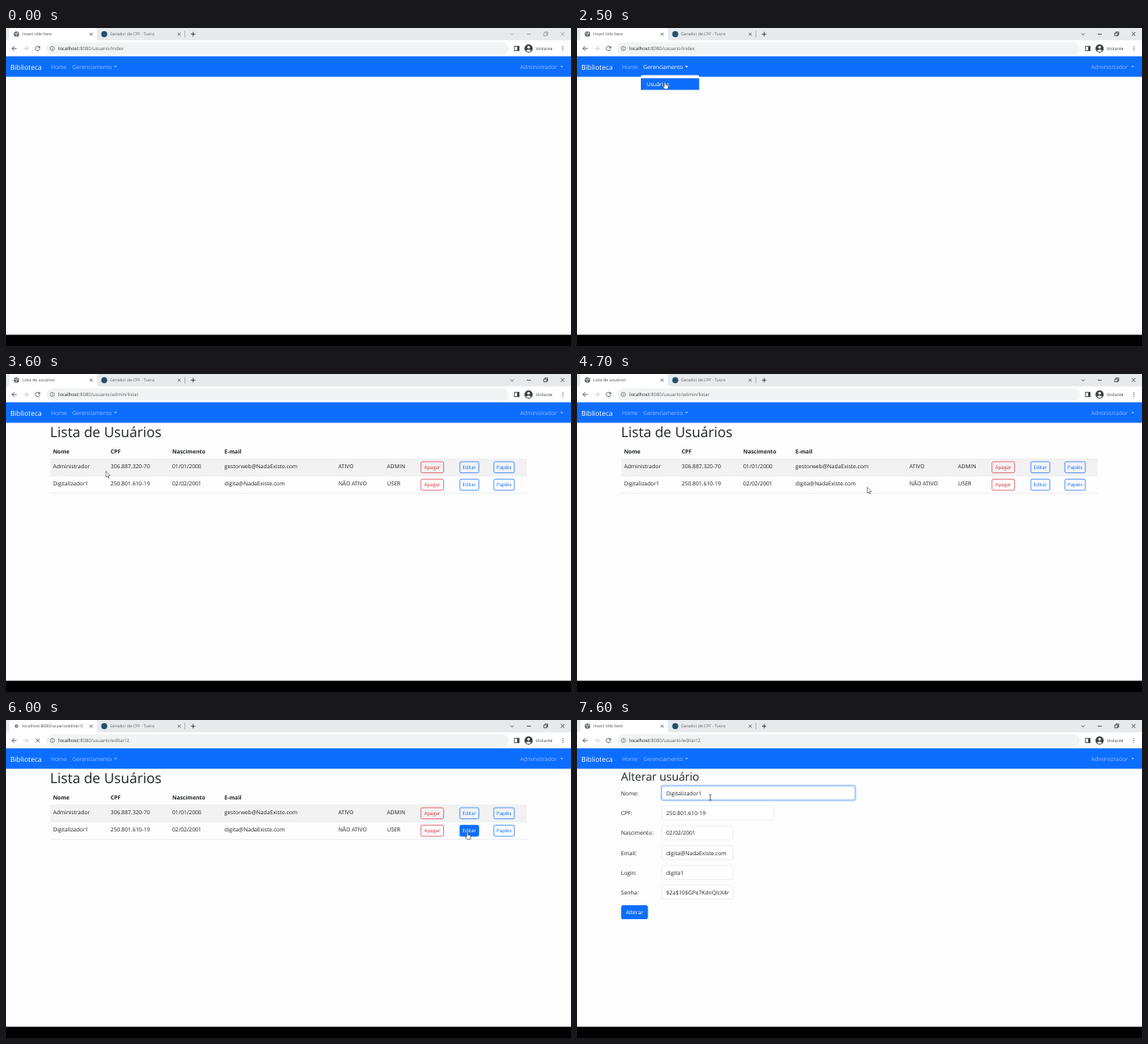
Write an HTML page that moves like this. It is 690 px wide and 388 px high and loops after 8000 ms.

```html
<!DOCTYPE html>
<html lang="pt">
<head>
<meta charset="utf-8">
<title>Biblioteca</title>
<style>
html, body { margin: 0; width: 100%; height: 100%; overflow: hidden; background: #fdfdfd; }
svg#stage { display: block; width: 100vw; height: 100vh; }
text { font-family: "Open Sans", "Noto Sans", sans-serif; font-size: 6.72px; fill: #212529; text-rendering: geometricPrecision; white-space: pre; }
</style>
</head>
<body>
<svg id="stage" viewBox="0 0 690 388"></svg>
<script>
const LOOP = 8000;
const BLUE = '#0d6efd';
const RED = '#dc3545';

// Markup helpers
const text = (x, y, str, attrs = '') => `<text x="${x}" y="${y}" ${attrs}>${str}</text>`;
const sized = (px, fill) => `style="font-size:${px}px;fill:${fill}"`;
const rect = (x, y, w, h, fill, attrs = '') =>
  `<rect x="${x}" y="${y}" width="${w}" height="${h}" fill="${fill}" ${attrs}/>`;
const circle = (x, y, r, fill, attrs = '') => `<circle cx="${x}" cy="${y}" r="${r}" fill="${fill}" ${attrs}/>`;
const line = (d, color, width = 0.8, attrs = '') =>
  `<path d="${d}" fill="none" stroke="${color}" stroke-width="${width}" ${attrs}/>`;
const group = (id, content, attrs = '') => `<g id="${id}" ${attrs}>${content}</g>`;
const cross = (x, y, r, color, width) =>
  line(`M${x - r} ${y - r}l${2 * r} ${2 * r}m0 ${-2 * r}l${-2 * r} ${2 * r}`, color, width);
const caret = (x, y, fill) => `<path d="M${x} ${y}h4l-2 2z" fill="${fill}"/>`;

function browserBar() {
  const grey = '#5f6368';
  return rect(0, 0, 690, 15, '#e7eaed') +
    '<path d="M1 15q3 0 3-3V3q0-3 3-3H108q3 0 3 3v9q0 3 3 3z" fill="#fff"/>' +
    rect(0, 15, 690, 20, '#fff') +
    group('globe', circle(0, 0, 3.3, grey) +
      line('M-2.4-1.2L-.4-.6 .1 .8-.7 2.6M.7-2.6L.9-1 2.6-.2', '#fff', 0.8), 'transform="translate(12.8 7.5)"') +
    group('spinner', circle(0, 0, 2, grey) + circle(0, 0, 0.8, '#fff'), 'transform="translate(12.8 7.5)"') +
    text(20, 9.3, '', `id="tabTitle" ${sized(5.05, '#45494d')}`) +
    cross(104, 7.5, 1.7, '#3c4043', 0.8) +
    circle(120, 7.5, 3.7, '#24506f') +
    text(127, 9.3, 'Gerador de CPF - Tuvra', sized(5.05, grey)) +
    cross(211.5, 7.5, 1.7, '#3c4043', 0.8) +
    line('M218.5 3.5v8', '#8d9196', 0.6) +
    line('M225.8 7.5h5.4m-2.7-2.7v5.4', '#3c4043', 0.9) +
    group('windowButtons',
      line('M616 6.5l2 2 2-2M636 7.5h5M656.8 6h3.6v3.6h-3.6zM658 6V4.9h3.6v3.6h-1.2M677.4 5l4.6 4.6m0-4.6l-4.6 4.6', 'currentColor', 0.7)) +
    line('M13 25H7.4m2.7-2.8L7.3 25l2.8 2.8', '#4a4d51', 0.9) +
    line('M21.5 25h5.6m-2.7-2.8l2.8 2.8-2.8 2.8', '#c3c6c9', 0.9) +
    group('reload', line('M40.6 23.2a2.7 2.7 0 1 0 .6 2.3', '#4a4d51', 0.9) +
      '<path d="M41.5 21.8v2.8h-2.8z" fill="#4a4d51"/>') +
    group('stop', cross(38.7, 25, 2.3, '#4a4d51', 0.9)) +
    rect(49, 17.5, 565, 15, '#f1f3f4', 'rx="7.5"') +
    circle(56.5, 25, 2.6, 'none', `stroke="${grey}" stroke-width=".7"`) +
    line('M56.5 24.6v1.8M56.5 23.2v.7', grey, 0.7) +
    `<text x="64" y="27.2" ${sized(5.9, grey)}><tspan fill="#202124">localhost</tspan><tspan id="path"></tspan></text>` +
    rect(621, 22.3, 5.6, 5.4, 'none', 'stroke="#3c4043" stroke-width=".9"') +
    rect(624.2, 22.3, 2.4, 5.4, '#3c4043') +
    circle(638.2, 25, 5, '#3c4043') + circle(638.2, 23.4, 1.6, '#fff') +
    '<path d="M635 27.8q3.2-3 6.4 0q-3.2 2.4-6.4 0z" fill="#fff"/>' +
    text(647, 26.9, 'Visitante', sized(5.1, '#3c4043')) +
    [22.7, 25, 27.3].map(y => circle(680, y, 0.65, '#4a4d51')).join('');
}

function navbar() {
  const dim = 'rgba(255,255,255,.55)';
  return rect(0, 34.5, 690, 25, BLUE) +
    text(5.3, 50.5, 'Biblioteca', sized(8.4, '#fff')) +
    text(55, 50, 'Home', `style="fill:${dim}"`) +
    group('menuLink', text(81, 50, 'Gerenciamento', 'style="fill:#fff"') + caret(131.8, 46.3, '#fff')) +
    text(627.8, 50, 'Administrador', `style="fill:${dim}"`) + caret(676.7, 46.3, dim);
}

const dropdown = () =>
  rect(78, 57.5, 71.2, 21, '#fdfdfd', 'rx="2" stroke="#000" stroke-opacity=".06" stroke-width=".5"') +
  rect(78, 61.3, 71.2, 14.2, 'none', 'id="menuItem"') +
  text(85, 71, 'Usuários', 'id="menuText"');

const outlineButton = (x, y, w, label, color, id = label + y) =>
  group(id, rect(x, y, w, 13.6, 'none', `rx="1.8" stroke="${color}" stroke-width=".7"`) +
    text(x + w / 2, y + 9, label, `text-anchor="middle" ${sized(6, color)}`));

function listPage() {
  const columns = [57.4, 127.8, 203, 266.8, 406, 465.3];
  const users = [
    ['Administrador', '306.887.320-70', '01/01/2000', 'gestorweb@NadaExiste.com', 'ATIVO', 'ADMIN'],
    ['Digitalizador1', '250.801.610-19', '02/02/2001', 'digita@NadaExiste.com', 'NÃO ATIVO', 'USER'],
  ];
  const heads = ['Nome', 'CPF', 'Nascimento', 'E-mail'];
  const row = (cells, i) => {
    const y = 103 + i * 21.3;
    return (i ? '' : rect(54, y, 582, 21.3, '#f2f2f2')) +
      line(`M54 ${y + 21.3}h582`, '#dee2e6', 0.6) +
      cells.map((cell, c) => text(columns[c], y + 12, cell)).join('') +
      outlineButton(506.8, y + 4, 27.6, 'Apagar', RED, 'delete' + i) +
      outlineButton(554.2, y + 4, 23.2, 'Editar', BLUE, 'edit' + i) +
      outlineButton(595.8, y + 4, 25, 'Papéis', BLUE, 'roles' + i);
  };
  return text(53.8, 77, 'Lista de Usuários', sized(17.1, '#212529')) +
    heads.map((head, c) => text(columns[c], 96.6, head, 'font-weight="700"')).join('') +
    users.map(row).join('');
}

function formPage() {
  const fields = [
    ['Nome', 'Digitalizador1', 236], ['CPF', '250.801.610-19', 137], ['Nascimento', '02/02/2001', 87],
    ['Email', 'digita@NadaExiste.com', 87], ['Login', 'digita1', 87], ['Senha', '$2a$10$GPe7KdnQIcX4n', 87],
  ];
  const field = ([label, value, width], i) => {
    const y = 80.6 + i * 24.25;
    return text(53.8, y + 11.2, label + ':') +
      rect(103.5, y, width, 16.9, '#fff', `rx="2.4" stroke="#dfe3e7" stroke-width=".6"`) +
      `<svg x="109" y="${y}" width="${width - 10.4}" height="17">${text(0, 11.2, value)}</svg>`;
  };
  return text(53.8, 74, 'Alterar usuário', sized(13.75, '#212529')) +
    fields.map(field).join('') +
    group('focus',
      rect(102.6, 79.7, 237.8, 18.7, 'none', `rx="3.2" stroke="${BLUE}" stroke-opacity=".25" stroke-width="1.8"`) +
      rect(103.5, 80.6, 236, 16.9, 'none', 'rx="2.4" stroke="#86b7fe" stroke-width=".7"')) +
    group('textCaret', line('M152.3 84.6v9', '#212529', 0.6)) +
    rect(54, 226, 32.6, 17, BLUE, 'rx="2.6"') +
    text(70.3, 237.3, 'Alterar', 'text-anchor="middle" style="fill:#fff"');
}

const pointers = () =>
  group('arrow', '<path d="M0 0v7.4l1.7-1.6 1.2 2.7 1.1-.5-1.2-2.6h2.4z" fill="#fff" stroke="#222" stroke-width=".5"/>') +
  group('hand', '<path d="M-.8.7Q0-.6.8.7V3.3l2.7.8q.9.3.7 1.4L3.6 8.6H-.6L-2.6 5.4q.2-1 1.8.1z" fill="#fff" stroke="#222" stroke-width=".55"/>') +
  group('beam', line('M-1.4-3.6Q0-3.6 0-3Q0-3.6 1.4-3.6M0-3v6M-1.4 3.6Q0 3.6 0 3Q0 3.6 1.4 3.6', '#222', 0.7));

document.getElementById('stage').innerHTML =
  rect(0, 0, 690, 388, '#fdfdfd') + browserBar() + navbar() +
  group('menu', dropdown()) + group('list', listPage()) + group('form', formPage()) +
  rect(0, 374.3, 690, 14, '#000') + group('cursor', pointers());

const el = id => document.getElementById(id);
const show = (id, on) => el(id).setAttribute('display', on ? 'inline' : 'none');

// Pointer path: time, x, y
const route = [
  [1500, 132, 62], [1900, 110, 48], [2000, 110, 48], [2400, 107.5, 66], [2900, 107.5, 66],
  [3300, 130, 95], [3600, 122, 118.5], [3800, 119, 121], [4700, 354.5, 138], [5500, 566, 136],
  [5900, 563.5, 137], [6100, 563.5, 137], [6500, 66, 224], [6800, 153, 93.5], [7100, 162.8, 94.5],
];

function pointerAt(t) {
  const next = route.findIndex(p => p[0] > t);
  if (next < 0) return route[route.length - 1].slice(1);
  const [t0, x0, y0] = route[Math.max(0, next - 1)];
  const [t1, x1, y1] = route[next];
  const u = Math.max(0, (t - t0) / (t1 - t0));
  const k = u * u * (3 - 2 * u);
  return [x0 + (x1 - x0) * k, y0 + (y1 - y0) * k];
}

function pointerShape(t, x, y) {
  const inside = (left, top, right, bottom) => x > left && x < right && y > top && y < bottom;
  if (t < 2800) return y < 57 || t >= 2100 ? 'hand' : 'arrow';
  if (t < 6100) return inside(554, 128, 577.5, 142) ? 'hand' : 'arrow';
  return inside(103, 80, 340, 98) ? 'beam' : 'arrow';
}

function update(time) {
  const t = Math.floor(time / 100) * 100;
  const onList = t >= 2700 && t < 6100;
  const loading = t === 6000;
  const menuOpen = t >= 2100 && t < 2700;
  const pressed = t >= 2500;
  const [x, y] = pointerAt(t);
  const shape = pointerShape(t, x, y);

  el('tabTitle').textContent = loading ? 'localhost:8080/usuario/editar/2'
    : onList ? 'Lista de usuários' : 'Insert title here';
  el('path').textContent = ':8080/usuario/' + (t < 2700 ? 'index' : t < 6000 ? 'admin/listar' : 'editar/2');
  el('windowButtons').setAttribute('color', t < 1500 ? '#8b8e92' : '#202124');
  show('globe', !loading);
  show('spinner', loading);
  show('reload', !loading);
  show('stop', loading);

  const hovered = t >= 1500 && t < 2100 && y < 57;
  el('menuLink').setAttribute('opacity', menuOpen ? 1 : hovered ? 0.75 : 0.55);
  show('menu', menuOpen);
  el('menuItem').setAttribute('fill', pressed ? BLUE : y > 61 ? '#e9ecef' : 'none');
  el('menuText').style.fill = pressed ? '#fff' : '#212529';

  show('list', onList);
  const editHover = onList && shape === 'hand';
  const [box, label] = el('edit1').children;
  box.setAttribute('fill', editHover ? BLUE : 'none');
  label.style.fill = editHover ? '#fff' : BLUE;

  show('form', t >= 6100);
  show('focus', t >= 7100);
  show('textCaret', t >= 7100 && t < 7600);

  show('cursor', t >= 1500);
  el('cursor').setAttribute('transform', `translate(${x} ${y})`);
  for (const id of ['arrow', 'hand', 'beam']) show(id, id === shape);
}

const start = performance.now();
function tick() {
  update((performance.now() - start) % LOOP);
  requestAnimationFrame(tick);
}
tick();
</script>
</body>
</html>
```
